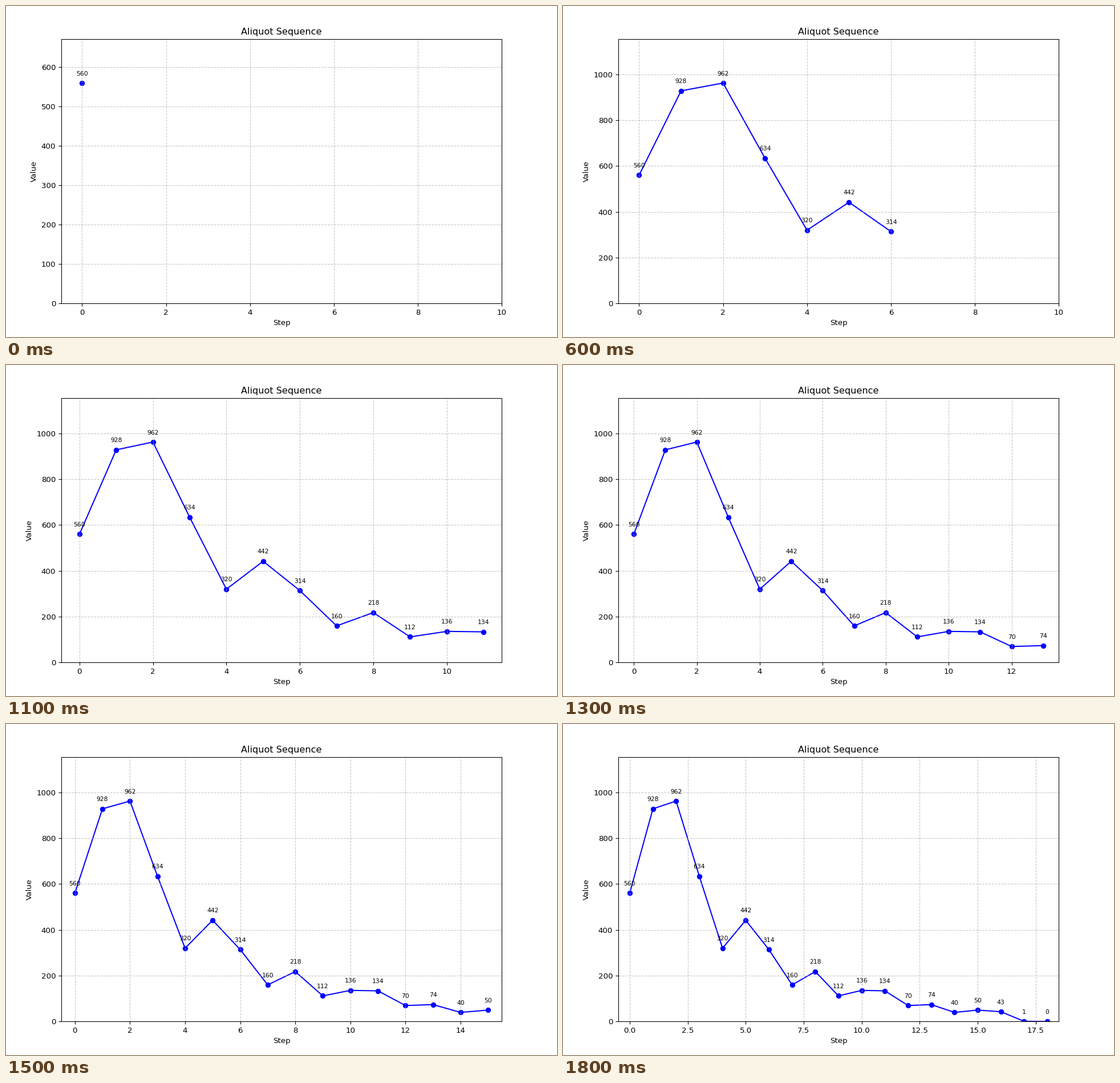
These frames come from a looping animation (966x580 px, 1900 ms). A matplotlib script:

```python
import matplotlib.pyplot as plt
from matplotlib.animation import FuncAnimation

WIDTH, HEIGHT, DPI = 966, 580, 96.6
LEFT, TOP, PLOT_W, PLOT_H = 96.6, 57.7, 772.8, 463.7  # plot area in pixels
START = 560
STEP_MS = 100


def divisor_sum(n):
    """Sum of the proper divisors of n."""
    return sum(d for d in range(1, n // 2 + 1) if n % d == 0)


def aliquot(n):
    terms = [n]
    while terms[-1] > 0:
        terms.append(divisor_sum(terms[-1]))
    return terms


values = aliquot(START)

plt.rcParams["font.family"] = "DejaVu Sans"
# The tiny margin keeps the pixel size from being rounded down.
fig = plt.figure(figsize=((WIDTH + 1e-6) / DPI, (HEIGHT + 1e-6) / DPI), dpi=DPI)
ax = fig.add_axes([LEFT / WIDTH, 1 - (TOP + PLOT_H) / HEIGHT,
                   PLOT_W / WIDTH, PLOT_H / HEIGHT])


def draw(step):
    shown = values[:step + 1]
    ax.clear()
    ax.set_title("Aliquot Sequence")
    ax.set_xlabel("Step")
    ax.set_ylabel("Value")
    ax.grid(True, linestyle="--", alpha=0.7)

    # The curve lies under the grid, the labels above it.
    ax.plot(range(len(shown)), shown, "bo-", zorder=1)
    for x, value in enumerate(shown):
        ax.annotate(str(value), (x, value), xytext=(0, 10),
                    textcoords="offset points", ha="center", fontsize=8)

    ax.set_xlim(-0.5, max(10, step + 0.5))
    ax.set_ylim(0, max(shown) * 1.2)
    return ax.get_children()


anim = FuncAnimation(fig, draw, frames=len(values), interval=STEP_MS,
                     repeat=True, repeat_delay=0, blit=False)
plt.show()
```
